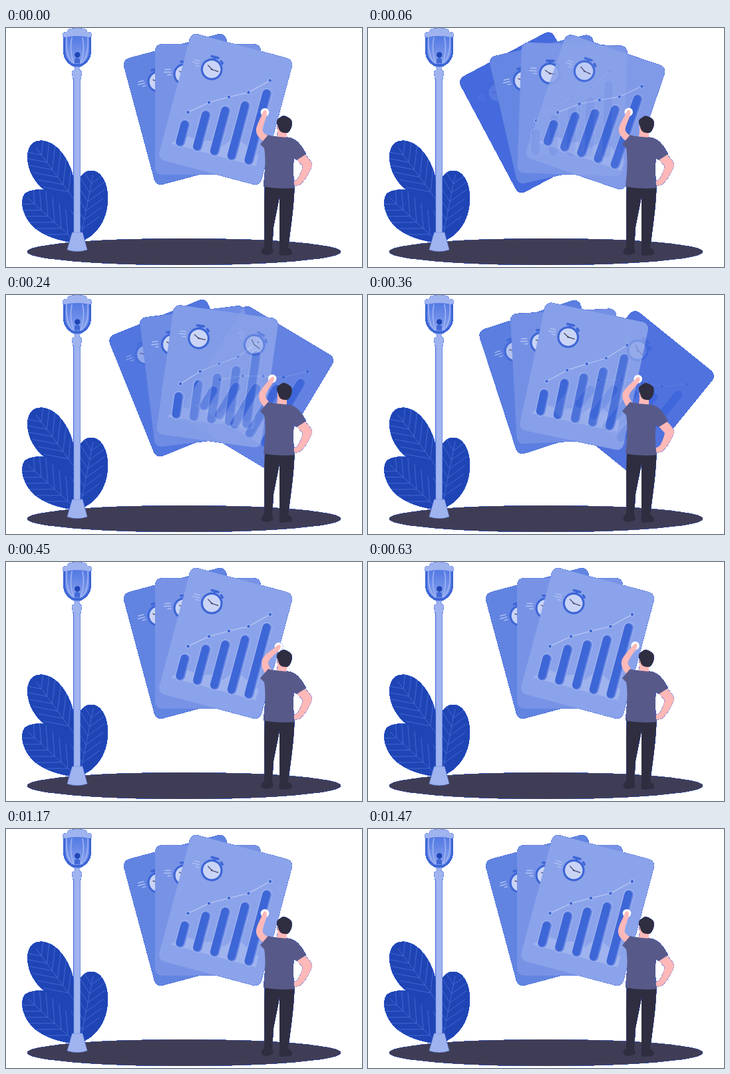
These frames come from a looping animation (535 px wide and 360 px high, 1.8 s). An HTML page:

```html
<!DOCTYPE html>
<html lang="en">
<head>
<meta charset="utf-8">
<title>Report cards</title>
<style>
  html, body { margin: 0; height: 100%; overflow: hidden; background: #fff; }
  svg { display: block; width: 100%; height: 100%; }
</style>
</head>
<body>
<svg viewBox="0 0 535 360">
  <defs>
    <!-- Hard blue rim behind the soft edge pixels of every silhouette -->
    <filter id="rim" filterUnits="userSpaceOnUse" x="0" y="0" width="535" height="360" color-interpolation-filters="sRGB">
      <feComponentTransfer in="SourceAlpha" result="hard">
        <feFuncR type="linear" slope="0" intercept=".22"/>
        <feFuncG type="linear" slope="0" intercept=".38"/>
        <feFuncB type="linear" slope="0" intercept=".86"/>
        <feFuncA type="linear" slope="40" intercept="-4"/>
      </feComponentTransfer>
      <feMerge><feMergeNode in="hard"/><feMergeNode in="SourceGraphic"/></feMerge>
    </filter>
    <linearGradient id="glass" x2="0" y2="1">
      <stop offset="0" stop-color="#5279e3"/>
      <stop offset="1" stop-color="#88a1ee"/>
    </linearGradient>
    <path id="leaves" d="M104 268C106 235 100 208 84 188C72 172 53 165 41 173C29 182 31 204 38 219C48 241 66 252 104 268Z
      M106 324C107 290 108 270 92 256C70 241 38 240 28 250C20 262 26 285 41 299C58 315 84 321 106 324Z
      M109 323C138 313 153 287 153 256C153 235 144 216 130 215C119 214 111 222 109 233Z"/>
    <clipPath id="inLeaves"><use href="#leaves"/></clipPath>
    <rect id="sheet" x="-79.5" y="-98.3" width="159" height="196.6" rx="10"/>
    <g id="chart" fill="none" stroke-linecap="round">
      <path d="M-66 71C-56 59-44 50-32 56S-14 45 0 54S16 36 30 39S52 52 66 54V71Z" fill="#fff" fill-opacity=".17"/>
      <g id="bars"></g>
      <polyline id="trend" stroke="#c3cff6"/>
      <g id="dots" fill="#3d66d6" stroke="#a9bbf1" stroke-width="1"></g>
      <path d="M-64.500-60h8M-66-56h10M-60.500-52h5" stroke="#b4c4f4" stroke-width="1.400"/>
      <g transform="translate(-35.700 -52.800)">
        <path d="M-5-19h10M0-18v4M10.700-15.200l2.500 2.500" stroke="#3d66d6" stroke-width="3.600"/>
        <circle r="14.800" fill="#c9d4f6" stroke="#3d66d6" stroke-width="3.200"/>
        <path d="M-7-4.500L0 0L10 .8" stroke="#45425f" stroke-width="1.300"/>
        <circle r="1.300" fill="#45425f"/>
      </g>
    </g>
  </defs>

  <g filter="url(#rim)">
    <ellipse cx="267.5" cy="337" rx="235.5" ry="20" fill="#3f3d56"/>

    <use href="#leaves" fill="#1f45b5"/>
    <path id="veins" clip-path="url(#inLeaves)" fill="none" stroke="#4a6fd9" stroke-width=".8"/>

    <g fill="#9fb3ef">
      <path d="M102 74h9.500V312H102Z" stroke="#6f8de6" stroke-width=".6"/>
      <path d="M99.500 308H115L122 334Q107 339 92 334Z" stroke="#6f8de6" stroke-width=".6"/>
      <path d="M99 53H115L109.500 62L114 66L112.500 76.500H100.500L99 66L104 62Z"/>
      <path d="M86 12H128V33C128 45 122 53 114 57Q107 60 100 57C92 53 86 45 86 33Z" fill="#3d66d6"/>
      <path d="M89 12H125V33C125 43 120 50 113 53Q107 55 101 53C94 50 89 43 89 33Z" fill="url(#glass)"/>
      <path d="M103 53V47Q107 43 111 47V53Z" fill="#4168d5"/>
      <circle cx="107.300" cy="40.500" r="4.200" fill="#1f45b5"/>
      <path d="M91 14C90 30 92 44 100 53M99 14C96 28 98 43 102 54M115 14C118 28 116 43 112 54M123 14C124 30 122 44 114 53" fill="none" stroke="#9db3f2" stroke-width="1.600"/>
      <path d="M94 2Q107-2 120 2L122 6Q129 6 129 10T125 14Q107 10 89 14Q85 14 85 10T92 6Z"/>
    </g>

    <g id="cards"></g>

    <g fill="#ffb8b8">
      <path d="M447 189C453 194 460 201 460 207C456 219 449 229 443 235Q437 239 432 236L433 230L438 228C442 221 445 214 446 208L437 198Z"/>
      <g id="arm">
        <path d="M385 130C380 140 375 150 376 156C377 163 383 168 390 173L399 165C392 162 386 158 385.500 154C386 146 390 138 392 131Z"/>
        <circle cx="389" cy="127" r="6.300" fill="#fff"/>
        <path d="M384.500 132C385 127 387 124 390 124C393 126 392 130 391 134Z"/>
      </g>
      <path d="M407.500 147H422V166H406Q409 160 407.500 147Z"/>
    </g>
    <g fill="#2f2e41">
      <path d="M407 143C406 137 411 136 413 134C418 130 422 134 426 136C431 139 430 145 429 149C427 155 424 159 419 158C413 158 410 154 409 149Z"/>
      <path d="M389 237H433.500C433 268 428 300 424 331C431 334 432 341 427 342L413 343Q409 342 411 333L411 254L402 300L400 331Q404 338 399 340Q390 344 385 340Q381 336 388 330C389 300 387 270 389 237Z"/>
    </g>
    <path d="M382 175L394 161C402 164 414 164 426 165C438 168 445 178 451 190L437 199L432.500 196C431 212 432 227 433.500 241Q410 243 387 239C389 219 391 198 388 181Z" fill="#575a89"/>
  </g>
</svg>

<script>
const LOOP = 1800, SWING = 450, TICK = 30;
const SVG = "http://www.w3.org/2000/svg";
const byId = id => document.getElementById(id);

function add(parent, tag, attrs = {}) {
  const node = document.createElementNS(SVG, tag);
  set(node, attrs);
  return parent.appendChild(node);
}
function set(node, attrs) {
  for (const name in attrs) node.setAttribute(name, attrs[name]);
}

// Chart: five capsule bars under a rising line.
const column = i => -53.4 + 26.7 * i;
const barTops = [38, 16, 2, -13, -39];
const trend = [18.9, -3.7, -19.2, -33.6, -59.4];
barTops.forEach((top, i) => {
  const capsule = (dx, color, width) => add(byId("bars"), "path", {
    d: `M${column(i) + dx} ${top}V65`, stroke: color, "stroke-width": width
  });
  capsule(0.5, "#a9bbf1", 16);
  capsule(0.5, "#6887e4", 14.2);
  capsule(-0.3, "#3d66d6", 11.5);
});
byId("trend").setAttribute("points", trend.map((y, i) => [column(i), y]).join(" "));
trend.forEach((y, i) => add(byId("dots"), "circle", { cx: column(i), cy: y, r: 2.7 }));

// A midrib from tip to stem with side veins that lean towards the tip.
function leafVeins(x0, y0, x1, y1, reach, count) {
  const axis = Math.atan2(y0 - y1, x0 - x1);
  let d = `M${x0} ${y0}L${x1} ${y1}`;
  for (let i = 1; i <= count; i++) {
    const u = i / (count + 1);
    const x = x0 + (x1 - x0) * u, y = y0 + (y1 - y0) * u;
    for (const side of [-0.75, 0.75])
      d += `M${x} ${y}l${reach * Math.cos(axis + side)} ${reach * Math.sin(axis + side)}`;
  }
  return d;
}
byId("veins").setAttribute("d",
  leafVeins(45, 180, 102, 258, 38, 6) +
  leafVeins(33, 256, 103, 320, 38, 6) +
  leafVeins(131, 221, 112, 316, 32, 6));

// Stations of the fan: each card travels from one to the next.
const darkBack = [64, 102, 220];
const stations = [
  { x: 247, y: 128, angle: -30, color: darkBack },
  { x: 277, y: 122.5, angle: -15, color: [98, 132, 225] },
  { x: 303.5, y: 122.5, angle: 0, color: [120, 147, 230] },
  { x: 330, y: 122.5, angle: 15, color: [139, 163, 234] },
  { x: 417.5, y: 153, angle: 45, color: darkBack }
];
const rgb = color => `rgb(${color})`;
const mix = (a, b, p) => a + (b - a) * p;

function makeCard(withChart = true) {
  const group = add(byId("cards"), "g");
  const sheet = add(group, "use", { href: "#sheet" });
  const chart = withChart && add(group, "use", { href: "#chart" });
  return { group, sheet, chart };
}
const leavingBack = makeCard(false);
const cards = [0, 1, 2, 3].map(() => makeCard());
const [entering, , , leaving] = cards;
set(leavingBack.sheet, { fill: rgb(darkBack) });

function draw(time) {
  const p = time < SWING ? time / SWING : 0;
  const moving = p > 0 ? "visible" : "hidden";

  cards.forEach((card, i) => {
    const from = stations[i], to = stations[i + 1];
    const at = key => mix(from[key], to[key], p);
    const transform = `translate(${at("x")} ${at("y")}) rotate(${at("angle")})`;
    set(card.group, { transform });
    const color = card === leaving
      ? from.color
      : from.color.map((c, k) => Math.round(mix(c, to.color[k], p)));
    set(card.sheet, { fill: rgb(color) });
    if (card === leaving) set(leavingBack.group, { transform });
  });

  // The front card fades away over the others and leaves its plain back behind them.
  set(leaving.group, { opacity: 1 - p });
  set(leavingBack.group, { visibility: moving });
  set(entering.group, { visibility: moving });
  set(entering.chart, { opacity: p });

  const lift = Math.max(0, 1 - Math.abs(time - SWING) / SWING);
  set(byId("arm"), { transform: `rotate(${27.5 * lift} 398.5 170)` });
}

const start = performance.now();
function frame() {
  const time = (performance.now() - start) % LOOP;
  draw(Math.floor(time / TICK) * TICK);
  requestAnimationFrame(frame);
}
frame();
</script>
</body>
</html>
```
